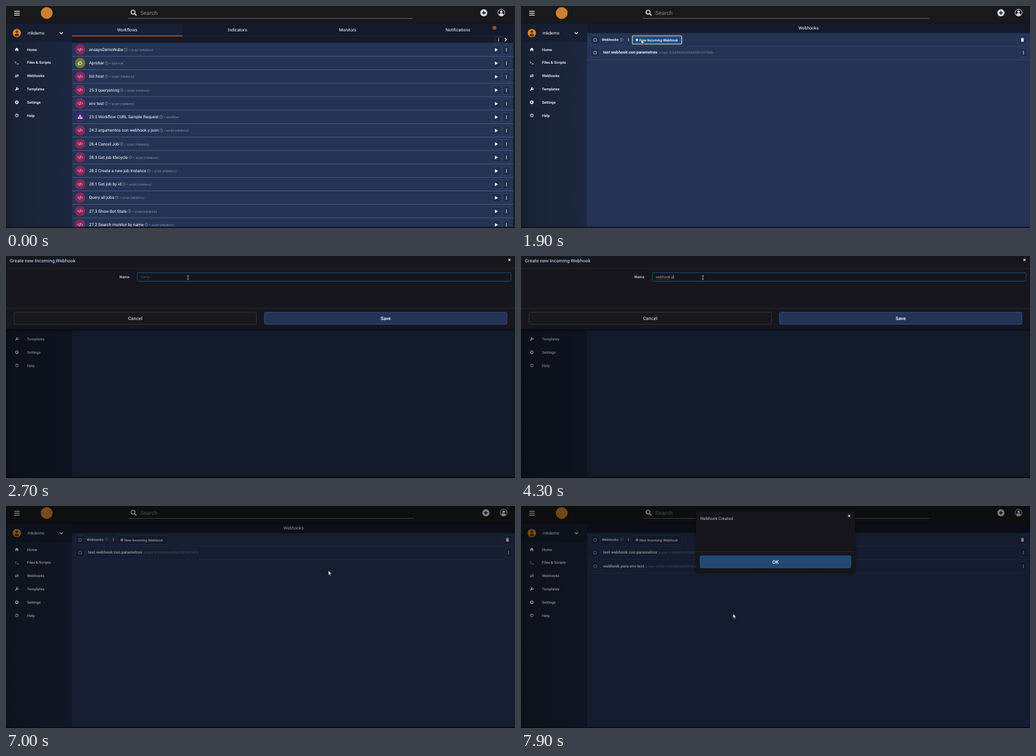
Write an HTML page that moves like this. It is 800 by 350 pixels and loops after 8000 ms.

```html
<!DOCTYPE html>
<html lang="en">
<head>
<meta charset="utf-8">
<title>Webhook creation</title>
<style>
html, body { margin: 0; width: 100%; height: 100%; overflow: hidden; background: #17191c; }
svg { display: block; width: 800px; height: 350px; }
text { font-family: Roboto, "Liberation Sans", sans-serif; white-space: pre; text-rendering: geometricPrecision; }
</style>
</head>
<body>
<svg id="stage" viewBox="0 0 800 350" xmlns="http://www.w3.org/2000/svg"></svg>
<script>
const LOOP = 8000;
const USER = 'mkdemo';
const PALE = '#a9bde6';
const stage = document.getElementById('stage');
const pen = document.createElement('canvas').getContext('2d');

const width = (s, size, weight = 400) => {
  pen.font = `${weight} 100px Roboto, "Liberation Sans", sans-serif`;
  return pen.measureText(s).width * size / 100;
};
// y is the vertical centre of the capitals
const text = (x, y, size, s, fill = '#fff', more = '') =>
  `<text x="${x}" y="${y + size * 0.355}" font-size="${size}" fill="${fill}" ${more}>${s.replace(/&/g, '&amp;')}</text>`;
const rect = (x, y, w, h, fill, more = '') =>
  `<rect x="${x}" y="${y}" width="${w}" height="${h}" fill="${fill}" ${more}/>`;
const circle = (x, y, r, fill, more = '') =>
  `<circle cx="${x}" cy="${y}" r="${r}" fill="${fill}" ${more}/>`;
const line = (d, color = '#fff', w = 1, more = '') =>
  `<path d="${d}" fill="none" stroke="${color}" stroke-width="${w}" ${more}/>`;
const shape = (d, fill = '#fff') => `<path d="${d}" fill="${fill}"/>`;
const at = (x, y, inner, id = '') => `<g ${id && `id="${id}"`} transform="translate(${x} ${y})">${inner}</g>`;
const group = (id, inner) => `<g id="${id}">${inner}</g>`;

const MID = 'text-anchor="middle"';
const MEDIUM = 'font-weight="500"';
const BOLD = 'font-weight="700"';
const ITALIC = 'font-style="italic"';

const kebab = (x, y) => [-2, 0, 2].map(d => circle(x, y + d, 0.75, '#fff')).join('');
const box = (x, y, w, h, fill = '#202e4e') => rect(x, y, w, h, fill, 'rx="1.5" stroke="#3d4c70" stroke-width=".7"');
const help = (x, y) => circle(x, y, 2.3, 'none', 'stroke="#7c879d" stroke-width=".7"') +
  text(x, y, 3.6, '?', '#8d97ab', MID + ' ' + BOLD);
const cross = (x, y) => line(`M${x - 1.7} ${y - 1.7}l3.4 3.4m0-3.4l-3.4 3.4`, '#d5d8dd', 1.1);
const checkbox = y => box(109, y - 7, 15, 14) +
  rect(114.4, y - 2.1, 4.2, 4.2, 'none', 'rx=".7" stroke="#b9c0ce" stroke-width=".8"');

function header(lineEnd, plusX, userX) {
  return rect(0, 0, 800, 28, '#17191c') + rect(0, 26.6, 800, 1, '#0f141f') +
    line('M13 8.3h8.5m-8.5 3h8.5m-8.5 3h8.5', '#e8eaee', 1.3) +
    circle(64, 11, 9.3, '#cf7f31') +
    circle(199.7, 9.7, 3.1, 'none', 'stroke="#e8eaee" stroke-width="1.4"') +
    line('M202 12l3 3', '#e8eaee', 1.7) +
    text(211, 11, 8.9, 'Search', '#85888d') +
    line(`M191.5 19.5H${lineEnd}`, '#77797d', 0.8) +
    circle(plusX, 10.7, 5.6, '#d9deea') +
    line(`M${plusX - 3} 10.7h6m-3-3v6`, '#17191c', 1.5) +
    circle(userX, 10.5, 5.4, 'none', 'stroke="#d9deea" stroke-width="1"') +
    circle(userX, 8.9, 2, '#d9deea') +
    shape(`M${userX - 3.7} 14.2q.5-2.9 3.7-2.9t3.7 2.9q-3.7 2.8-7.4 0z`, '#d9deea');
}

const gear = circle(0, 0, 1.9, 'none', 'stroke="#fff" stroke-width="1.3"') +
  circle(0, 0, 2.6, 'none', 'stroke="#fff" stroke-width=".8" stroke-dasharray="1.02 1.02"');
const menu = [
  ['Home', shape('M-3 .1L0-2.7 3 .1H2.2V2.6H.7V.8H-.7V2.6H-2.2V.1z')],
  ['Files & Scripts', line('M-2.7-1.8l1.6 1.6-1.6 1.6M-.3 2H2.8', '#fff', 0.8)],
  ['Webhooks', line('M-2.7-1.1H1.6M2.7 1.1H-1.6', '#fff', 0.9) + shape('M1.3-2.6L3.1-1.1 1.3.3zM-1.3 2.6L-3.1 1.1-1.3-.3z')],
  ['Templates', line('M-2.3 2.3L1 -1', '#fff', 1.4) + line('M1.2-2.5A1.6 1.6 0 1 0 2.5-1.1', '#fff', 1.1)],
  ['Settings', gear],
  ['Help', circle(0, 0, 2.4, 'none', 'stroke="#fff" stroke-width=".8"') + text(0, 0, 4, '?', '#fff', MID + ' ' + BOLD)]
];

const sidebar = rect(0, 28, 104, 322, 'url(#side)') + rect(0, 28, 104, 29, '#141c2b', 'opacity=".6"') +
  circle(17, 42.7, 6.5, '#e08a2c') + circle(17, 40.6, 2.1, '#5d3514') +
  shape('M13.2 46.4q.4-3 3.8-3t3.8 3q-3.8 3-7.6 0z', '#5d3514') +
  text(34, 42.7, 6.75, USER) +
  line('M84.3 41.4l2.6 2.6 2.6-2.6', '#fff', 1.2) +
  menu.map(([name, icon], i) => {
    const y = 68.5 + i * 20.8;
    return at(17, y, icon) + text(33, y, 5.85, name, '#fff', MEDIUM);
  }).join('');

const codeIcon = line('M-1.9-1.8L-3.7 0l1.8 1.8M1.9-1.8L3.7 0 1.9 1.8M.7-2.6L-.7 2.6', '#f0dce6', 0.9);
const thumbIcon = line('M-3-.5h1.4v3.3H-3zM-1.6-.3L.2-3.2q1.3.1.6 2.5h2q.6 3-1 3.5H-1.6', '#fff', 0.8);
const flowIcon = shape('M-1-3h2v2h-2zM-3.6 1h2v2h-2zM-1 1h2v2h-2zM1.6 1h2v2h-2z') + line('M0-1V1M-2.6 1V0H2.6V1', '#fff', 0.6);
const kinds = {
  script: ['#86285a', codeIcon, `script (${USER})`],
  approval: ['#6c7a30', thumbIcon, 'approval'],
  workflow: ['#3f2a70', flowIcon, 'workflow']
};
const jobs = ['ensayoDemoNube', 'Aprobar', 'list host', '25.3 querystring', 'env test',
  '23.5 Workflow CURL Sample Request', '24.2 argumentos con webhook y json', '28.4 Cancel Job',
  '28.3 Get job lifecycle', '28.2 Create a new job instance', '28.1 Get job by id',
  'Query all jobs', '27.3 Show Bot Stats', '27.2 Search monitor by name'];

function jobRow(name, i) {
  const y = 68.7 + i * 21.22;
  const [color, icon, label] = kinds[{ 1: 'approval', 5: 'workflow' }[i] || 'script'];
  const end = 130.5 + width(name, 6.6);
  return line(`M104 ${y + 10.6}H797`, '#52648d', 0.8) +
    circle(116.5, y, 8.1, color) + at(116.5, y, icon) +
    text(130.5, y, 6.6, name) + help(end + 4, y) +
    text(end + 8.3, y + 0.6, 4.95, '= ' + label, '#8d97ab', ITALIC) +
    box(763.5, y - 6.6, 14.5, 14) + shape(`M768.5 ${y - 2.4}l5 2.8-5 2.8z`) +
    box(780.5, y - 6.6, 12, 14) + kebab(786.5, y + 0.4);
}

const tabs = ['Workflows', 'Indicators', 'Monitors', 'Notifications'];
const workflows = header(639, 751, 778.5) + rect(104, 28, 693, 30, '#141a29') +
  rect(104, 28, 173, 19, '#172036') +
  tabs.map((s, i) => text(190.6 + i * 173.25, 37.3, 6.8, s, '#fff', MID)).join('') +
  rect(104, 46.8, 693, 0.8, '#232c40') + rect(104, 46.5, 173.3, 1.4, '#b9602a') +
  circle(767.7, 34.5, 3, '#a24f1c') +
  box(768.5, 48.8, 11.5, 9, '#0f1420') + kebab(774.3, 53.2) +
  line('M784 50.6l2.5 2.5-2.5 2.5', '#fff', 1.3) +
  rect(104, 58, 693, 292, '#253455') + jobs.map(jobRow).join('') +
  rect(797, 0, 3, 350, '#1a1d24') + sidebar;

function hookRow(y, name, id) {
  return checkbox(y) + text(129, y - 0.5, 6.4, name, '#e9edf5', BOLD) +
    text(131 + width(name, 6.4, 700), y, 4.95, 'unique id:' + id, '#7a859b') +
    box(784, y - 7, 11.5, 14) + kebab(789.7, y) +
    line(`M104 ${y + 10.9}H800`, '#435176', 0.7, 'stroke-dasharray="1 .6"');
}

const webhooks = header(641.5, 754.3, 782) + rect(104, 28, 696, 14.5, '#141a29') +
  text(452, 35, 6.8, 'Webhooks', '#fff', MID) +
  rect(104, 42.5, 696, 308, '#253455') +
  group('list',
    checkbox(53.5) + text(127, 53, 5.6, 'Webhooks', '#e9edf5', BOLD) + help(158.3, 53) +
    line('M168.8 50.6v5', '#dfe4ee', 0.9) +
    box(174.5, 46.5, 78.5, 14) +
    group('focus', rect(175, 47, 77.5, 13, '#1e4e82', 'rx="1.5" stroke="#e2d3b8" stroke-width="1.2"')) +
    line('M180 53.5h4.4m-2.2-2.2v4.4', '#fff', 1.3) +
    text(186, 53.5, 5.75, 'New Incoming Webhook', '#fff', ITALIC + ' ' + MEDIUM) +
    box(780.8, 46.5, 14.5, 14) +
    shape('M786 52h4.2l-.4 4.3h-3.4zM785.5 50.7h1.5l.4-.7h1.4l.4.7h1.5v.8h-5.2z') +
    line('M104 63.6H800', '#35446a', 0.7) +
    hookRow(73.6, 'test webhook con parametros', '5efb969cd286d2001287960b')) +
  group('added', hookRow(94.9, 'webhook para env test', '5f0c1f9403804ae90b72caf1')) + sidebar;

const form = rect(0, 0, 800, 115, '#17191c', 'filter="url(#shadow)"') +
  text(6, 7.3, 7.45, 'Create new Incoming Webhook', PALE, MEDIUM) + cross(791.3, 6.2) +
  line('M0 19.5H800M0 82.5H800', '#292c30', 0.8) +
  text(178.3, 32.8, 5.9, 'Name', PALE, BOLD) +
  rect(206.4, 26.3, 587.2, 13.6, '#14171a', 'rx="1.5" stroke="#1d4f78" stroke-width="1"') +
  text(211.5, 33, 5.75, 'name', '#664d41', 'id="hint"') +
  text(211.5, 33, 5.75, '', '#a8988e', 'id="typed"') +
  line('', '#b03a2e', 0.7, 'id="spell" stroke-dasharray="1.2 .5"') +
  line('', '#d8d8d8', 0.6, 'id="caret"') +
  rect(12.7, 88.7, 380.8, 19, '#17191c', 'rx="2" stroke="#3a3e43" stroke-width=".8"') +
  text(203, 98.2, 7.4, 'Cancel', '#e4e6ea', MID) +
  rect(406.3, 88.7, 381, 19, '#243459', 'rx="2" stroke="#3d5587" stroke-width=".8"') +
  text(596.7, 98.2, 7.4, 'Save', '#fff', MID + ' ' + MEDIUM);

const notice = rect(275, 9, 250, 95, '#17191c', 'rx="2" filter="url(#shadow)"') +
  text(281.5, 19.8, 6.55, 'Webhook Created', PALE) + cross(515.8, 15.6) +
  line('M275 72H525', '#2b2f34', 0.8) +
  rect(281.5, 78.5, 237, 19, '#204b75', 'rx="2" stroke="#295c8c" stroke-width=".7"') +
  text(400, 88.2, 7.6, 'OK', '#fff', MID + ' ' + MEDIUM);

const arrow = '<path d="M0 0V7L1.6 5.6 2.7 8 3.9 7.5 2.8 5.1H5z" fill="#fff" stroke="#111" stroke-width=".5"/>';
const beam = line('M-1.4-3.3q1.4 0 1.4.8 0-.8 1.4-.8M0-2.7V2.7M-1.4 3.3q1.4 0 1.4-.8 0 .8 1.4.8', '#cfd2d6', 0.7);

stage.innerHTML = `<defs>
  <linearGradient id="side"><stop stop-color="#161e2c"/><stop offset=".12" stop-color="#192336"/><stop offset="1" stop-color="#1c2740"/></linearGradient>
  <filter id="shadow" x="-5%" y="-10%" width="110%" height="130%"><feDropShadow dx="0" dy="1.5" stdDeviation="2" flood-opacity=".6"/></filter>
</defs>` +
  group('workflows', workflows) + group('webhooks', webhooks) +
  rect(0, 348.3, 800, 1.7, '#0f131c') +
  rect(0, 0, 800, 350, '#000', 'id="dim"') +
  group('form', form) + group('notice', notice) +
  at(0, 0, arrow, 'arrow') + at(286, 34, beam, 'beam');

const el = {};
stage.querySelectorAll('[id]').forEach(n => { el[n.id] = n; });
const show = (id, on) => el[id].setAttribute('display', on ? 'inline' : 'none');
const set = (id, name, value) => el[id].setAttribute(name, value);
const ramp = (t, a, b) => Math.min(1, Math.max(0, (t - a) / (b - a)));
const ease = p => p * p * (3 - 2 * p);

const NAME = 'webhook para env test';
const keys = [3000, 3300, 3400, 3600, 3800, 3900, 4000, 4200, 4300, 4400, 4500, 4600, 4700,
  4900, 5000, 5100, 5200, 6000, 6000, 6200, 6300];
const route = [[100, 120, 170], [500, 47, 108], [900, 47, 108], [1700, 189, 53], [2000, 189, 53],
  [2600, 286, 32], [6300, 286, 34], [6700, 507, 98], [6900, 507, 100], [7000, 506.7, 102],
  [7100, 495, 129.5], [7600, 345, 166], [7900, 333.3, 170]];

function pointer(t) {
  let i = route.findIndex(k => k[0] > t);
  if (i < 0) i = route.length;
  const a = route[Math.max(0, i - 1)], b = route[Math.min(i, route.length - 1)];
  const p = ease(ramp(t, a[0], b[0] + 0.01));
  return [a[1] + (b[1] - a[1]) * p, a[2] + (b[2] - a[2]) * p];
}

function typing(t) {
  const typed = NAME.slice(0, keys.filter(k => k <= t).length);
  const xAt = n => 211.5 + width(NAME.slice(0, n), 5.75);
  el.typed.textContent = typed;
  show('hint', !typed);
  const marks = [];
  if (t >= 4200) marks.push([0, 7]);
  if (t >= 5500) marks.push([13, 16]);
  set('spell', 'd', marks.map(([a, b]) => `M${xAt(a)} 37H${xAt(b)}`).join(''));
  set('caret', 'd', `M${xAt(typed.length) + 0.4} 29.6v6.6`);
  show('caret', typed && !(t >= 5500 && t < 5800));
}

function draw(time) {
  const t = Math.floor(time / 100) * 100;
  show('workflows', t < 600);
  show('webhooks', t >= 600);
  show('list', t >= 800);
  show('focus', t >= 1800 && t < 6900);
  show('added', t >= 7300);

  const opened = ramp(t, 1900, 2300), closed = ramp(t, 6700, 7000);
  const shown = Math.min(opened, 1 - closed);
  show('form', shown > 0);
  set('form', 'opacity', shown);
  set('form', 'transform', `translate(0 ${-30 * (1 - ease(shown))})`);
  typing(t);

  const told = ramp(t, 7500, 7800);
  show('notice', told > 0);
  set('notice', 'opacity', told);
  set('notice', 'transform', `translate(0 ${-25 * (1 - ease(told))})`);

  const dim = t < 7100 ? 0.5 * opened - 0.08 * closed : 0.45 * told;
  set('dim', 'opacity', dim);

  const [x, y] = pointer(t);
  const inField = t >= 2500 && t < 6500;
  show('beam', inField);
  show('arrow', t >= 100 && !inField);
  set('beam', 'transform', `translate(${x} ${t < 2700 ? y : 34})`);
  set('arrow', 'transform', `translate(${x} ${y})`);
}

const start = performance.now();
function tick() {
  draw((performance.now() - start) % LOOP);
  requestAnimationFrame(tick);
}
tick();
</script>
</body>
</html>
```
